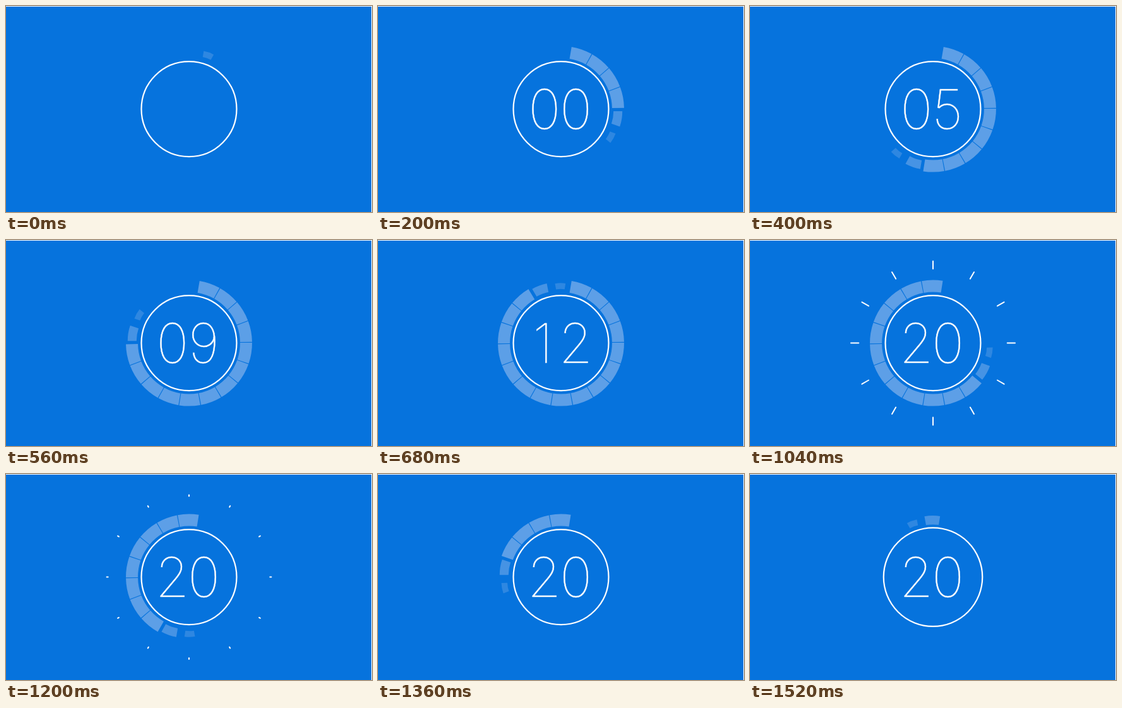
Animation, 580 px wide and 327 px high, one loop 1.56 s. Source, as an HTML page with a canvas:

```html
<!DOCTYPE html>
<html lang="en">
<head>
<meta charset="utf-8">
<title>Countdown ring</title>
<style>
  html, body { margin: 0; width: 100%; height: 100%; overflow: hidden; background: #fff; }
  canvas, svg { display: block; position: absolute; left: 0; top: 0; }
  text {
    font: 100 86.5px Inter, "Inter Thin", Roboto, sans-serif;
    font-optical-sizing: none;
    font-variation-settings: "opsz" 14;
    text-anchor: middle;
    fill: #fff;
    stroke: #fff;
    stroke-width: 0.5px;
  }
</style>
</head>
<body>
<canvas id="stage" width="580" height="327"></canvas>
<svg id="number" width="580" height="327"><text y="194.5"></text><text y="194.5"></text></svg>
<script>
const ctx = document.getElementById('stage').getContext('2d');
const number = document.getElementById('number');
const digits = number.querySelectorAll('text');
const LOOP = 1560, STEP = 40;
const CX = 290, CY = 163.6;
const SEGMENTS = 18, TICKS = 12;
const R_IN = 81, R_OUT = 100, R_MID = (R_IN + R_OUT) / 2;
const RAD = Math.PI / 180;
const BLUE = '#0673dd';

// Size and opacity of a segment, indexed by how many steps it has grown.
const LEVELS = [null, [0.5, 0.16], [0.74, 0.26], [1, 0.35]];
const clamp = (v, lo, hi) => Math.min(hi, Math.max(lo, v));

function rotated(deg, draw) {
  ctx.save();
  ctx.translate(CX, CY);
  ctx.rotate(deg * RAD);
  draw();
  ctx.restore();
}

function drawSegment(k, step) {
  const grown = clamp(step - k + 2, 0, 3);
  const shrunk = clamp(step - k - 19, 0, 3);
  const level = LEVELS[grown - shrunk];
  if (!level) return;
  const [scale, alpha] = level;
  const half = 9.65 * RAD, up = -Math.PI / 2;
  rotated(k * 360 / SEGMENTS - 0.7, () => {
    ctx.translate(0, -R_MID);
    ctx.scale(scale, scale);
    ctx.translate(0, R_MID);
    ctx.fillStyle = `rgba(255,240,248,${alpha})`;
    ctx.beginPath();
    ctx.arc(0, 0, R_OUT, up - half, up + half);
    ctx.arc(0, 0, R_IN, up + half, up - half, true);
    ctx.fill();
  });
}

function drawTicks(step) {
  if (step < 20 || step > 30) return;
  const head = 131 - 12.5 * (Math.max(0, 27 - step) / 6) ** 2;
  const tail = 112.5 + 4.7 * ((step - 21) / 5) ** 2;
  ctx.lineWidth = 2;
  ctx.lineCap = 'round';
  for (let i = 0; i < TICKS; i++) {
    rotated(i * 360 / TICKS, () => {
      ctx.beginPath();
      ctx.moveTo(0, -tail - 0.6);
      ctx.lineTo(0, -head + 0.6);
      ctx.stroke();
    });
  }
}

function drawCircle(step) {
  const swell = Math.max(0, step - 35) / 3;
  ctx.lineWidth = 2.2;
  ctx.beginPath();
  ctx.arc(CX, CY, 75.5 + 2.8 * swell, 0, 2 * Math.PI);
  ctx.stroke();
}

// Centres the ink of a digit on x; the narrow 1 lines up by its stem.
function setDigit(el, digit, x) {
  if (el.textContent === digit) return;
  const box = ctx.measureText(digit);
  const left = -box.actualBoundingBoxLeft, right = box.actualBoundingBoxRight;
  const ink = digit === '1' ? right - 3.5 : (left + right) / 2;
  el.textContent = digit;
  el.setAttribute('x', x + box.width / 2 - ink);
}

function drawNumber(step) {
  const text = String(clamp(step - 5, 0, 20)).padStart(2, '0');
  ctx.font = getComputedStyle(digits[0]).font || '100 86.5px Inter, sans-serif';
  setDigit(digits[0], text[0], 263.7);
  setDigit(digits[1], text[1], 313.5);
  number.style.opacity = clamp(step / 5, 0, 1);
}

function draw(step) {
  ctx.fillStyle = '#fff';
  ctx.fillRect(0, 0, 580, 327);
  ctx.fillStyle = BLUE;
  ctx.fillRect(0, 1, 579, 326);
  for (let k = 1; k <= SEGMENTS; k++) drawSegment(k, step);
  ctx.strokeStyle = '#fff';
  drawTicks(step);
  drawCircle(step);
  drawNumber(step);
}

const start = performance.now();
function frame() {
  const t = (performance.now() - start) % LOOP;
  draw(Math.floor(t / STEP));
  requestAnimationFrame(frame);
}
frame();
</script>
</body>
</html>
```
